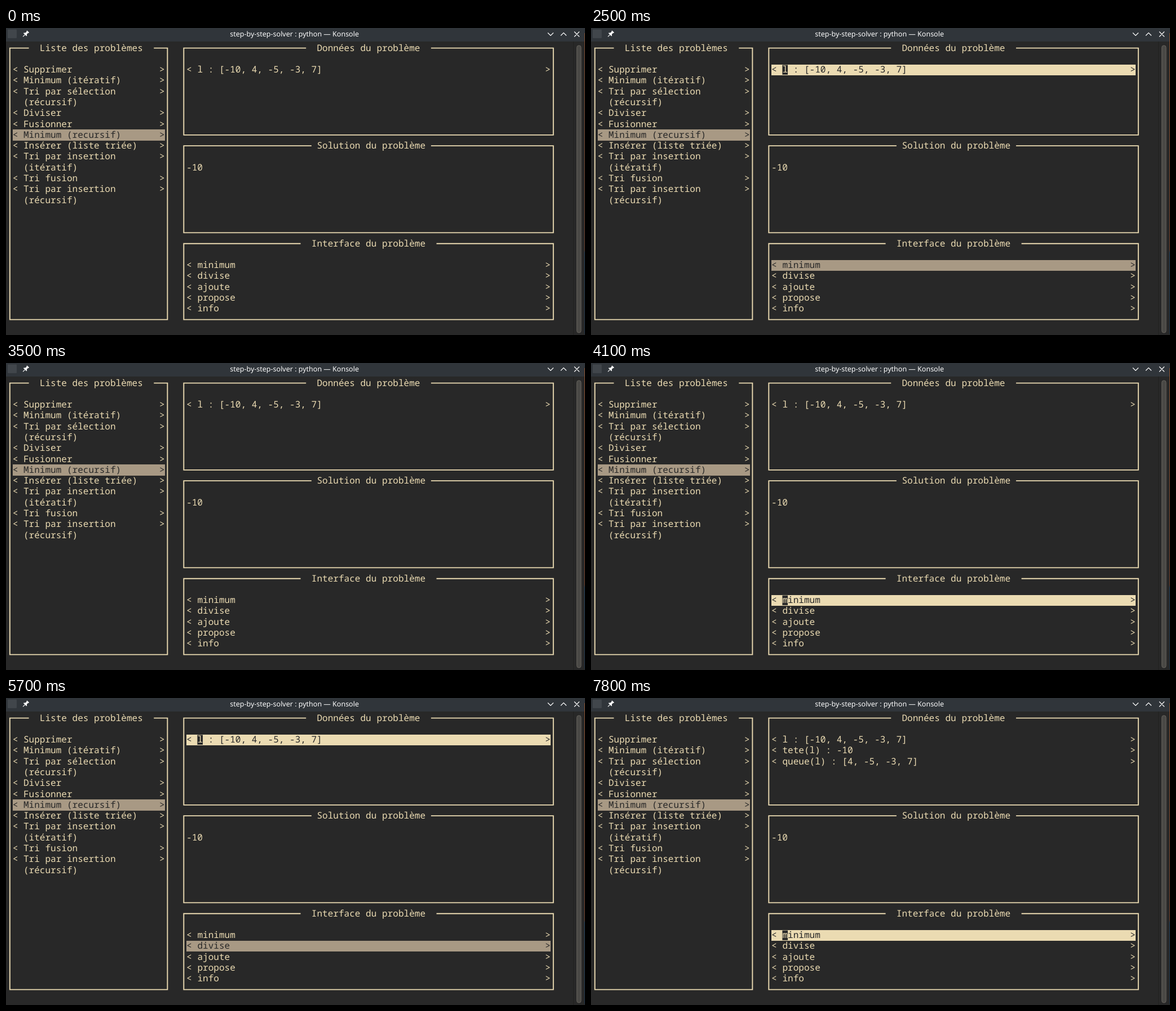
Recreate the animation shown at these times as an HTML page. Size 1027 px wide and 545 px high, loop 8000 ms.

```html
<!DOCTYPE html>
<html lang="fr">
<head>
<meta charset="utf-8">
<title>step-by-step-solver</title>
<style>
  html, body { margin: 0; width: 100%; height: 100%; overflow: hidden; background: #282828; }
  svg { display: block; width: 100%; height: 100%; }
  text { text-rendering: geometricPrecision; }
  #term text { font: 16.067px "Noto Sans Mono", "DejaVu Sans Mono", monospace; }
  #term path { fill: none; stroke: #ebdbb2; stroke-width: 1.9; }
  .caption { font: 12.5px "Noto Sans", "Open Sans", sans-serif; fill: #fcfcfc; }
  .icon { fill: none; stroke: #fcfcfc; stroke-width: 1.2; }
</style>
</head>
<body>
<svg viewBox="0 0 1027 545">
  <defs>
    <linearGradient id="edge" x1="0" y1="0" x2="0" y2="1">
      <stop offset="0" stop-color="#8a4f2c"/>
      <stop offset=".72" stop-color="#6b3a25"/>
      <stop offset=".73" stop-color="#1f3f5a"/>
      <stop offset="1" stop-color="#1b2f42"/>
    </linearGradient>
  </defs>
  <rect width="1027" height="545" fill="#282828"/>
  <g id="term"></g>

  <rect width="1027" height="24" fill="#30353a"/>
  <rect x="3" y="2.5" width="16" height="15.5" rx="1" fill="#41464b"/>
  <g fill="#fcfcfc" transform="translate(35 10.5) rotate(45)">
    <path d="M-2.6-6h5.2v1.4l-.8.6v3l2 1.8v1.2h-7.6V.8l2-1.8v-3l-.8-.6z"/>
    <rect x="-.6" y="2" width="1.2" height="5"/>
  </g>
  <text class="caption" x="511.6" y="15.3" text-anchor="middle">step-by-step-solver : python — Konsole</text>
  <path class="icon" d="M961 8.5l5 5 5-5M984 13.5l5-5 5 5M1008 6.5l9 9M1017 6.5l-9 9"/>

  <path d="M1006.5 24V545" stroke="#20211f"/>
  <rect x="1012.5" y="31" width="7.5" height="510" rx="3.75" fill="#4a4946" stroke="#66635c"/>
  <rect id="strip" x="1026" y="9" width="1" height="534" fill="url(#edge)"/>
</svg>
<script>
const INK = '#ebdbb2', PAPER = '#282828', DIM = '#a89984';
const CELL_W = 9.64, CELL_H = 19.28, LEFT = 2, TOP = 26, LOOP = 8000;
const term = document.getElementById('term');
const strip = document.getElementById('strip');

const STEPS = [
  { at: 0 },
  { at: 1000, focus: 'minimum' },
  { at: 2500, focus: 'l', picked: 'minimum' },
  { at: 2800, dialog: true },
  { at: 3500 },
  { at: 4100, focus: 'minimum' },
  { at: 4500, focus: 'divise' },
  { at: 5700, focus: 'l', picked: 'divise' },
  { at: 6100, split: true },
  { at: 7800, split: true, focus: 'minimum' }
];

const PROBLEMS = [
  'Supprimer', 'Minimum (itératif)', 'Tri par sélection|(récursif)', 'Diviser',
  'Fusionner', 'Minimum (recursif)', 'Insérer (liste triée)',
  'Tri par insertion|(itératif)', 'Tri fusion', 'Tri par insertion|(récursif)'
];
const ACTIONS = ['minimum', 'divise', 'ajoute', 'propose', 'info'];
const LIST = 'l : [-10, 4, -5, -3, 7]';
const PARTS = ['tete(l) : -10', 'queue(l) : [4, -5, -3, 7]'];

const colX = col => LEFT + col * CELL_W;
const rowY = row => TOP + row * CELL_H;

function add(tag, attrs, content = '') {
  const node = document.createElementNS('http://www.w3.org/2000/svg', tag);
  for (const name in attrs) node.setAttribute(name, attrs[name]);
  node.textContent = content;
  term.append(node);
}

function write(col, row, text, fill = INK) {
  add('text', { x: colX(col), y: rowY(row) + 14.6, fill }, text);
}

function block(col, row, cols, rows, fill) {
  const x = Math.round(colX(col)), y = Math.round(rowY(row));
  const width = Math.round(colX(col + cols)) - x;
  const height = Math.round(rowY(row + rows)) - y;
  add('rect', { x, y, width, height, fill });
}

function cursor(col, row, char, back, ink) {
  add('rect', { x: colX(col), y: rowY(row) + 1, width: CELL_W, height: 17.3, fill: back });
  write(col, row, char, ink);
}

// Border through cell centres, open between two columns of the top edge
function panel(col, row, endCol, endRow, gapStart, gapEnd) {
  const x1 = colX(col + .5), x2 = colX(endCol + .5);
  const y1 = rowY(row + .5), y2 = rowY(endRow + .5);
  add('path', { d: `M${colX(gapStart)} ${y1}H${x1}V${y2}H${x2}V${y1}H${colX(gapEnd)}` });
}

function button(col, endCol, row, label, look) {
  const ink = look ? PAPER : INK;
  if (look) block(col, row, endCol - col + 1, 1, look === 'focus' ? INK : DIM);
  write(col, row, '<', ink);
  label.split('|').forEach((line, i) => write(col + 2, row + i, line, ink));
  write(endCol, row, '>', ink);
  if (look === 'focus') cursor(col + 2, row, label[0], PAPER, INK);
}

function drawDialog() {
  block(21, 8, 60, 10, PAPER);
  panel(21, 8, 80, 17, 44, 58);
  block(44, 8, 14, 1, INK);
  write(45, 8, 'Informations', PAPER);
  write(22, 10, 'Le problème est trop dur');
  button(22, 79, 12, 'OK');
  cursor(24, 12, 'O', INK, PAPER);
}

function draw(state) {
  term.replaceChildren();
  const look = name => state.focus === name ? 'focus' : state.picked === name ? 'picked' : '';

  panel(0, 0, 29, 25, 4, 27);
  write(6, 0, 'Liste des problèmes');
  let row = 2;
  for (const label of PROBLEMS) {
    button(1, 28, row, label, label === 'Minimum (recursif)' ? 'picked' : '');
    row += label.split('|').length;
  }

  panel(32, 0, 100, 8, 55, 78);
  write(57, 0, 'Données du problème');
  button(33, 99, 2, LIST, look('l'));
  if (state.split) PARTS.forEach((part, i) => button(33, 99, 3 + i, part));

  panel(32, 9, 100, 17, 56, 78);
  write(57, 9, 'Solution du problème');
  write(33, 11, '-10');

  panel(32, 18, 100, 25, 54, 79);
  write(56, 18, 'Interface du problème');
  ACTIONS.forEach((name, i) => button(33, 99, 20 + i, name, look(name)));

  if (state.dialog) drawDialog();
}

let shown;
function tick() {
  const time = performance.now() % LOOP;
  const state = STEPS.findLast(step => step.at <= time);
  if (state !== shown) draw(shown = state);
  strip.setAttribute('opacity', time < 500 ? .85 : 1);
  requestAnimationFrame(tick);
}
tick();
</script>
</body>
</html>
```
